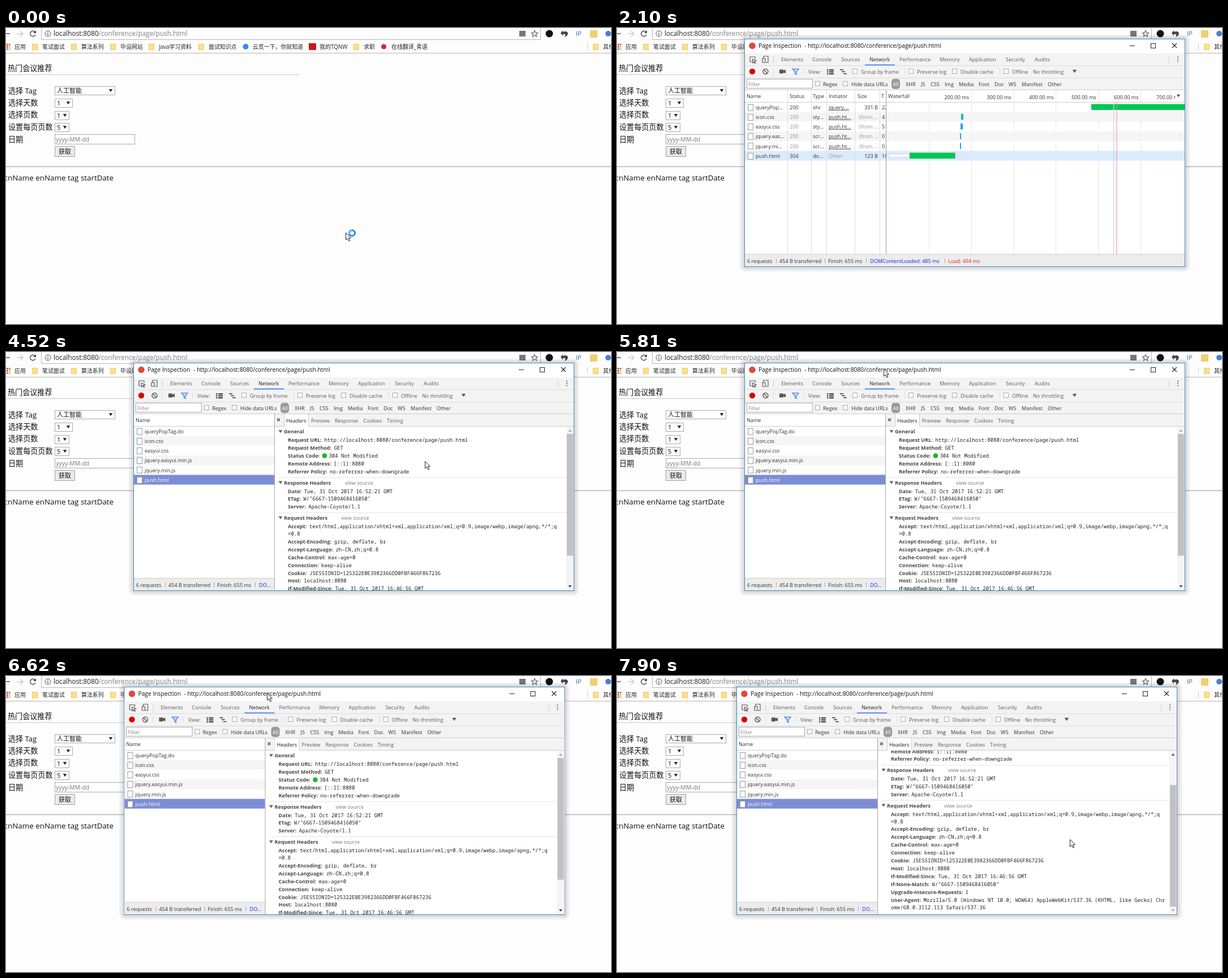
Recreate the animation shown at these times as an HTML page with a canvas. Size 1069x524 px, loop 8 s.

```html
<!DOCTYPE html>
<html lang="zh">
<head>
<meta charset="utf-8">
<style>
html, body { margin: 0; width: 100%; height: 100%; overflow: hidden; background: #fdfdfd; }
canvas { display: block; }
</style>
</head>
<body>
<canvas id="stage" width="1069" height="524"></canvas>
<script>
const c = document.getElementById('stage').getContext('2d');
const SANS = '"Open Sans", "Noto Sans CJK SC", "Noto Sans CJK", sans-serif';
const MONO = '"Noto Sans Mono", monospace';
const GRAY = '#5a5a5a', INK = '#303030', LINE = '#cdcdcd', BAR = '#f3f3f3';
const URL_TAIL = '/conference/page/push.html';
const PAGE_URL = 'http://localhost:8080' + URL_TAIL;
const LOOP = 8000;

// Step tracks: the last entry at or before the time holds.
const CURSOR = [
  [0, 600, 362, 'busy'], [150, 645, 440, 'arrow'], [270, 0, 0, 'none'],
  [2500, 383, 327, 'arrow'], [2650, 410, 240, 'arrow'], [2770, 445, 140, 'arrow'],
  [2890, 469, 52, 'arrow'], [3040, 346, 104, 'arrow'], [3190, 290, 175, 'arrow'],
  [3310, 259, 225, 'hand'], [3460, 262, 221, 'hand'], [3580, 259, 225, 'hand'],
  [4250, 657, 231, 'arrow'], [4400, 700, 214, 'arrow'], [4520, 740, 193, 'arrow'],
  [4670, 650, 193, 'arrow'], [4790, 735, 192, 'arrow'], [4940, 680, 150, 'arrow'],
  [5060, 600, 90, 'arrow'], [5180, 520, 50, 'arrow'], [5300, 478, 28, 'arrow'],
  [5450, 476, 29, 'arrow'], [5690, 473, 28, 'arrow'], [5810, 471, 30, 'arrow'],
  [5960, 447, 30, 'arrow'], [6080, 427, 30, 'arrow'], [6470, 460, 30, 'arrow'],
  [6620, 461, 30, 'arrow'], [6890, 464, 29, 'arrow'], [7170, 488, 71, 'arrow'],
  [7320, 787, 294, 'arrow'], [7480, 800, 289, 'arrow']
];
const DRAG = [[0, 0], [5960, -30], [6080, -50], [6470, -17], [6620, -16.5], [6770, -15], [6890, -14]];
const SCROLL = [[0, 0], [7630, 22], [7780, 54], [7900, 64.5]];
const at = (track, t) => track.findLast(k => k[0] <= t);

function text(s, x, y, color = GRAY, size = 9.1, weight = 400, family = SANS) {
  c.font = `${weight} ${size}px ${family}`;
  c.fillStyle = color;
  c.fillText(s, x, y);
  return x + c.measureText(s).width;
}
function fill(x, y, w, h, color) {
  c.fillStyle = color;
  c.fillRect(x, y, w, h);
}
function box(x, y, w, h, color, inside = '#fff') {
  fill(x, y, w, h, color);
  fill(x + 1, y + 1, w - 2, h - 2, inside);
}
const vline = (x, y0, y1, color = LINE) => fill(x, y0, 1, y1 - y0, color);
const hline = (x0, x1, y, color = LINE) => fill(x0, y, x1 - x0, 1, color);
function disc(x, y, r, color) {
  c.fillStyle = color;
  c.beginPath(); c.arc(x, y, r, 0, 7); c.fill();
}
function ring(x, y, r, color, w = 1.2, from = 0, to = 2 * Math.PI) {
  c.strokeStyle = color; c.lineWidth = w;
  c.beginPath(); c.arc(x, y, r, from, to); c.stroke();
}
function path(d, x, y, stroke, inside, w = 1.2) {
  const p = new Path2D(d);
  c.save(); c.translate(x, y);
  if (inside) { c.fillStyle = inside; c.fill(p); }
  if (stroke) { c.strokeStyle = stroke; c.lineWidth = w; c.stroke(p); }
  c.restore();
}
const down = (x, y, s, color) => path(`M${-s} ${-s * .7}H${s}L0 ${s * .8}Z`, x, y, null, color);
function panel(x, y, w, h, r, color) {
  c.fillStyle = color;
  c.beginPath(); c.roundRect(x, y, w, h, r); c.fill();
}

function browser() {
  fill(0, 0, 1069, 524, '#fdfdfd');
  hline(62, 945, 20, '#b5b5b5'); vline(62, 0, 20, '#b5b5b5'); vline(944, 0, 20, '#b5b5b5');
  path('M7 0H-5M0 -5L-5 0L0 5', 0, 10, '#555', null, 1.5);
  path('M0 0H11M6 -5L11 0L6 5', 19, 10, '#ccc', null, 1.5);
  ring(47.5, 10, 4.7, '#444', 1.5, .4, 5.6);
  path('M0 0V-5L-5 0Z', 53, 9, null, '#444');
  ring(74, 10, 5, '#555', 1); fill(73.4, 9, 1.3, 4, '#555'); fill(73.4, 6.8, 1.3, 1.3, '#555');
  text(URL_TAIL, text('localhost:8080', 84, 14, '#222', 11.8), 14, '#808080', 11.8);
  fill(907, 5, 11, 10, '#777');
  path('M0 -5.5L1.6 -1.8L5.5 -1.6L2.5 1L3.5 5L0 2.8L-3.5 5L-2.5 1L-5.5 -1.6L-1.6 -1.8Z', 934, 10, '#555', null, 1.1);
  disc(960, 10, 6.5, '#111');
  path('M0 0L4 -5V-2Q12 -5 13 1Q11 7 7 6Q11 1 4 2V5Z', 980, 9, null, '#444');
  text('IP', 1007, 14, '#3a6f9c', 11);
  fill(1032, 4, 13, 13, '#f0cf72');
  disc(1064, 10, 5, '#4a7fd0');

  ['#e34', '#e34', '#4a5', '#48e', '#e34', '#fb3', '#4a5', '#48e', '#fb3']
    .forEach((k, i) => fill(-3 + i % 3 * 4, 28 + (i / 3 | 0) * 4, 2.8, 2.8, k));
  [46, 115, 184, 252, 340, 614, 1037].forEach(x => box(x, 28, 10, 11, '#eccb63', '#fce08b'));
  [['应用', 15], ['笔试面试', 64], ['算法系列', 133], ['毕设网站', 202], ['java学习资料', 270], ['面试知识点', 358],
   ['云觅一下，你就知道', 436], ['我的TQNW', 554], ['求职', 632], ['在线翻译_青语', 681], ['其他', 1055]]
    .forEach(([s, x]) => text(s, x, 37, '#222', 9.9));
  disc(423.5, 33, 5, '#3d87e6'); fill(535, 27, 13, 12, '#c81a1a'); disc(667.5, 33, 4.5, '#dd2233');
  vline(1027, 27, 39); hline(0, 1069, 44, '#b5b5b5');
}

function form() {
  text('热门会议推荐', 3, 76, '#111', 13.1);
  hline(0, 518, 82, '#c8c8c8');
  [['选择 Tag', 116], ['选择天数', 137], ['选择页数', 158], ['设置每页页数', 180], ['日期', 202]]
    .forEach(([s, y]) => text(s, 4, y, '#111', 13.1));
  [['人工智能', 103, 107], ['1', 125, 32], ['1', 147, 26], ['5', 168, 26]].forEach(([s, y, w]) => {
    box(86, y, w, 16, '#a9a9a9');
    text(s, 90, y + 12.3, '#111', 11);
    down(86 + w - 8, y + 7.5, 3.3, '#222');
  });
  box(86, 188, 142, 18, '#a9a9a9');
  text('yyyy-MM-dd', 88, 201, '#777', 10.4);
  box(86, 209, 36, 19, '#a0a0a0', '#eaeaea');
  text('获取', 93, 223, '#111', 11);
  hline(0, 1069, 245, '#999');
  text('cnName enName tag startDate', -3.4, 270, '#111', 13.4);
}

function frame() {
  panel(217, 12, 795, 419, 10, 'rgba(0,0,0,.06)');
  panel(221, 15, 787, 412, 6, 'rgba(0,0,0,.07)');
  box(225, 19, 779, 404, '#4285b4');
  disc(239, 31.5, 5.8, '#dc4a3d');
  text('Page Inspection', 250, 35, '#111', 10.26);
  text('- ' + PAGE_URL, 331, 35, '#111', 10.26);
  hline(906, 915, 31, '#222');
  box(943, 27, 9, 9, '#222');
  path('M0 0L8 8M8 0L0 8', 981, 27, '#222', null, 1.1);

  fill(226, 45, 777, 64, BAR);
  [66, 88, 109].forEach(y => hline(226, 1003, y, y === 109 ? LINE : '#dcdcdc'));
  path('M9 4V0H0V9H4M4 4L11 7L8 8L10 11L8 11L7 9L5 11Z', 235, 51, GRAY, null, 1.2);
  path('M2 5V0H10V11H6M0 4H5V11H0Z', 257, 50, GRAY, null, 1.2);
  vline(276, 50, 62); vline(975, 50, 62);
  [51, 55, 59].forEach(y => disc(991, y + .5, 1.1, GRAY));
  [['Elements', 290], ['Console', 345], ['Sources', 396], ['Network', 446], ['Performance', 499], ['Memory', 570],
   ['Application', 622], ['Security', 687], ['Audits', 738]]
    .forEach(([s, x]) => text(s, x, 59, s === 'Network' ? '#222' : GRAY));
  fill(438, 64.5, 53, 1.8, '#4285f4');

  disc(239, 77, 5.2, '#d90000');
  ring(262.5, 77, 4.5, GRAY, 1.5);
  path('M-3 -3L3 3', 262.5, 77, GRAY, null, 1.5);
  [276, 329, 508, 676].forEach(x => vline(x, 71, 83, '#ddd'));
  path('M0 0H7V2L11 0V7L7 5V7H0Z', 287, 73.5, null, '#555');
  path('M0 0H11L7 5V10L4.5 8.5V5Z', 310, 72.5, '#3b78e7', '#c9dcfb', 1.2);
  [0, 3.5, 7].forEach((y, i) => {
    fill(371, 73 + y, 2.5, 2.3, '#444'); fill(375, 73 + y, 8, 2.3, '#444');
    fill(394 + i * 3, 73 + y, 6, 1.6, '#444');
  });
  [['View:', 338], ['Group by frame', 431], ['Preserve log', 530], ['Disable cache', 607], ['Offline', 698], ['No throttling', 735]]
    .forEach(([s, x]) => text(s, x, 81));
  [[416, 72], [515, 72], [592, 72], [683, 72], [350, 94], [399, 94]].forEach(([x, y]) => box(x, y, 9, 9, '#aaa'));
  down(808.5, 76.5, 3.7, GRAY);

  box(229, 90, 117, 17, '#a9a9a9');
  text('Filter', 232, 103, '#888');
  panel(485, 90, 15, 18, 5, '#999');
  text('All', 487.5, 103, '#fff');
  [['Regex', 364], ['Hide data URLs', 414], ['XHR', 510], ['JS', 537], ['CSS', 554], ['Img', 579], ['Media', 604],
   ['Font', 639], ['Doc', 667], ['WS', 692], ['Manifest', 715], ['Other', 761]]
    .forEach(([s, x]) => text(s, x, 103, INK));
}

const ROW = 17.2, rowTop = i => 131.5 + i * ROW;
function rows(names, right, picked, ink) {
  names.forEach((s, i) => {
    const y = rowTop(i), last = i === 5;
    if (i % 2) fill(226, y, right - 226, ROW, last ? picked : '#f5f5f5');
    box(231, Math.round(y + 3), 10, 12, '#999');
    text(s, 245, y + 12.3, last ? ink : INK);
  });
}

function footer(right) {
  fill(226, 400, right - 226, 22, '#ececec');
  hline(226, right, 400);
  [['6 requests', 230], ['454 B transferred', 287], ['Finish: 655 ms', 373]].forEach(([s, x]) => text(s, x, 416, INK));
  [[281, '#eaa23a'], [367, '#7fb0dc'], [440, '#7fb0dc']].forEach(([x, k]) => vline(x, 408, 416, k));
}

function requests(hover) {
  fill(226, 110, 777, 312, '#fff');
  hline(226, 1003, 131);
  [['Name', 229], ['Status', 305], ['Type', 346], ['Initiator', 374], ['Size', 425], ['T', 467], ['Waterfall', 479]]
    .forEach(([s, x]) => text(s, x, 124, INK));
  for (let i = 0; i < 6; i++) vline(Math.round(551 + i * 74.8), i ? 110 : 132, 400, '#e6e6e6');
  const picked = hover ? '#e4eefb' : '#dcebfc';
  rows(['queryPop...', 'icon.css', 'easyui.css', 'jquery.eas...', 'jquery.mi...', 'push.html'], 1003, picked, INK);
  const cells = [
    ['200', 'xhr', 'jquery....', '331 B', '22'], ['200', 'sty...', 'push.ht...', '(from ...', '4'],
    ['200', 'sty...', 'push.ht...', '(from ...', '5'], ['200', 'scr...', 'push.ht...', '(from ...', '0'],
    ['200', 'scr...', 'push.ht...', '(from ...', '0'], ['304', 'do...', 'Other', '123 B', '10']
  ];
  c.save();
  c.beginPath(); c.rect(226, 110, 249, 290); c.clip();
  cells.forEach(([status, type, from, size, time], i) => {
    const y = rowTop(i) + 12.3, cached = i > 0 && i < 5;
    text(status, 305, y, cached ? '#909090' : INK);
    text(type, 346, y, INK);
    const end = text(from, 374, y, i === 5 ? '#909090' : INK);
    if (i < 5) hline(374, end, Math.round(y + 1), '#555');
    c.textAlign = 'right'; text(size, 461, y, cached ? '#909090' : INK); c.textAlign = 'left';
    text(time, 468, y, INK);
  });
  c.restore();
  [301, 343, 370, 420, 464].forEach(x => vline(x, 110, 400, '#dadada'));
  vline(475, 110, 400, '#999');

  c.textAlign = 'right';
  for (let i = 2; i < 7; i++) text(i + '00.00 ms', 622 + (i - 2) * 74.9, 126, INK);
  c.textAlign = 'left';
  text('700.00 r', 953, 126, INK);
  down(992, 120, 3.2, '#555');

  const bar = (i, x, w, color) => fill(x, rowTop(i) + 3.2, w, 10.5, color);
  box(835, 138, 3, 4, '#ddd');
  bar(0, 838, 164, '#00c853'); bar(0, 1002, 1.5, '#1e9be8');
  box(605, 155, 3, 4, '#ddd'); bar(1, 608, 1.5, '#00b877'); bar(1, 609.5, 2.5, '#1aa3e8');
  bar(2, 607, 4, '#1aa3e8'); bar(3, 606, 2, '#1aa3e8'); bar(4, 606, 2, '#1aa3e8');
  box(479, 223, 39, 6, '#d8d8d8');
  bar(5, 517, 79, '#00c853'); bar(5, 596, 1.7, '#1aa3e8');
  fill(877, 131, 1.3, 269, '#cfcdf5'); fill(882.5, 131, 1, 269, '#e58a8a');

  footer(1003);
  text('DOMContentLoaded: 485 ms', 447, 416, '#1c1cf0');
  vline(579, 408, 416, '#eaa23a');
  text('Load: 494 ms', 585, 416, '#ee2020');
}

const SECTIONS = [
  ['General', 144.3, 0, [
    ['Request URL:', PAGE_URL], ['Request Method:', 'GET'], ['Status Code:', '304 Not Modified'],
    ['Remote Address:', '[::1]:8080'], ['Referrer Policy:', 'no-referrer-when-downgrade']]],
  ['Response Headers', 234.5, 599, [
    ['Date:', 'Tue, 31 Oct 2017 16:52:21 GMT'], ['ETag:', 'W/"6667-1509468416050"'], ['Server:', 'Apache-Coyote/1.1']]],
  ['Request Headers', 297, 592, [
    ['Accept:', 'text/html,application/xhtml+xml,application/xml;q=0.9,image/webp,image/apng,*/*;q', '=0.8'],
    ['Accept-Encoding:', 'gzip, deflate, br'], ['Accept-Language:', 'zh-CN,zh;q=0.8'],
    ['Cache-Control:', 'max-age=0'], ['Connection:', 'keep-alive'],
    ['Cookie:', 'JSESSIONID=125322E0E3982366DD0FBF466F867236'], ['Host:', 'localhost:8080'],
    ['If-Modified-Since:', 'Tue, 31 Oct 2017 16:46:56 GMT'], ['If-None-Match:', 'W/"6667-1509468416050"'],
    ['Upgrade-Insecure-Requests:', '1'],
    ['User-Agent:', 'Mozilla/5.0 (Windows NT 10.0; WOW64) AppleWebKit/537.36 (KHTML, like Gecko) Chr', 'ome/60.0.3112.113 Safari/537.36']]]
];

function headers(scroll) {
  const mono = (s, x, y) => text(s, x, y, '#222', 9, 400, MONO);
  c.save();
  c.beginPath(); c.rect(475, 132, 515, 290); c.clip();
  c.translate(0, -scroll);
  SECTIONS.forEach(([title, top, link, lines], n) => {
    if (n) hline(482, 990, Math.round(top - 13), '#e4e4e4');
    down(485, top - 3.5, 3.5, '#666');
    text(title, 491, top, '#484848', 9.1, 700);
    if (link) text('view source', link, top, '#777');
    let y = top + 15;
    for (const [name, value, more] of lines) {
      let x = text(name, 498, y, '#484848', 9.1, 700) + 4.5;
      if (name === 'Status Code:') { disc(x + 4, y - 3.5, 4.3, '#1fb52b'); x += 11.5; }
      mono(value, x, y);
      if (more) mono(more, 498, y += 13);
      y += 13.9;
    }
  });
  c.restore();

  fill(990, 132, 13, 290, '#f4f4f4');
  fill(991, 145 + scroll * .744, 11, 215.5, '#c1c1c1');
  path('M-3 2H3L0 -2Z', 996.5, 139, null, scroll ? '#555' : '#aaa');
  path('M-3 -2H3L0 2Z', 996.5, 415, null, scroll > 64 ? '#aaa' : '#444');
}

function details(scroll) {
  fill(226, 110, 777, 312, '#fff');
  text('Name', 229, 124, INK);
  hline(226, 474, 131);
  rows(['queryPopTag.do', 'icon.css', 'easyui.css', 'jquery.easyui.min.js', 'jquery.min.js', 'push.html'], 474, '#7d8dd5', '#fff');
  footer(474);
  text('DO...', 447, 416, '#1c1cf0');
  fill(475, 110, 528, 21, BAR);
  hline(475, 1003, 131);
  box(491, 110, 44, 22, LINE); fill(492, 110, 42, 22, '#fff');
  path('M-2.5 -2.5L2.5 2.5M2.5 -2.5L-2.5 2.5', 481.5, 120, '#444', null, 1.2);
  [['Headers', 495], ['Preview', 539], ['Response', 581], ['Cookies', 631], ['Timing', 673]]
    .forEach(([s, x], i) => text(s, x, 125, i ? GRAY : '#222'));
  headers(scroll);
  vline(474, 110, 422, '#a3a3a3');
}

function tooltip() {
  panel(277, 228, 229, 22, 2, 'rgba(0,0,0,.15)');
  box(276, 227, 229, 21, '#bbb');
  text(PAGE_URL, 283, 241, '#505050', 9.3);
}

function cursor([, x, y, kind]) {
  if (kind === 'none') return;
  if (kind === 'hand') {
    path('M4 11V2Q5.5 -.5 7 2V7Q9 6 9.5 8Q11.5 7 12 9Q14 8.5 14 11V14L12 19H5L1 13Q-1 9 2 10Z', x, y, '#111', '#fff', 1);
    path('M7 7V10M9.5 8V11M12 9V11', x, y, '#111', null, .8);
    return;
  }
  path('M.5 .5V13L3.5 10.3L5.7 15.2L7.7 14.3L5.6 9.6H9.5Z', x, y, '#222', '#fff', 1);
  if (kind === 'busy') {
    ring(x + 11.5, y + 1, 5, '#2f8be6', 3);
    ring(x + 11.5, y + 1, 5, '#55bdf2', 3, 3, 4.6);
  }
}

function draw(t) {
  browser();
  form();
  if (t >= 2100) {
    const open = t >= 3850;
    c.save();
    c.translate(at(DRAG, t)[1], 0);
    frame();
    if (open) details(at(SCROLL, t)[1]);
    else requests(t >= 3310);
    c.restore();
    if (t >= 3310 && t < 3970) tooltip();
  }
  cursor(at(CURSOR, t));
}

const start = performance.now();
function tick() {
  draw((performance.now() - start) % LOOP);
  requestAnimationFrame(tick);
}
tick();
</script>
</body>
</html>
```
